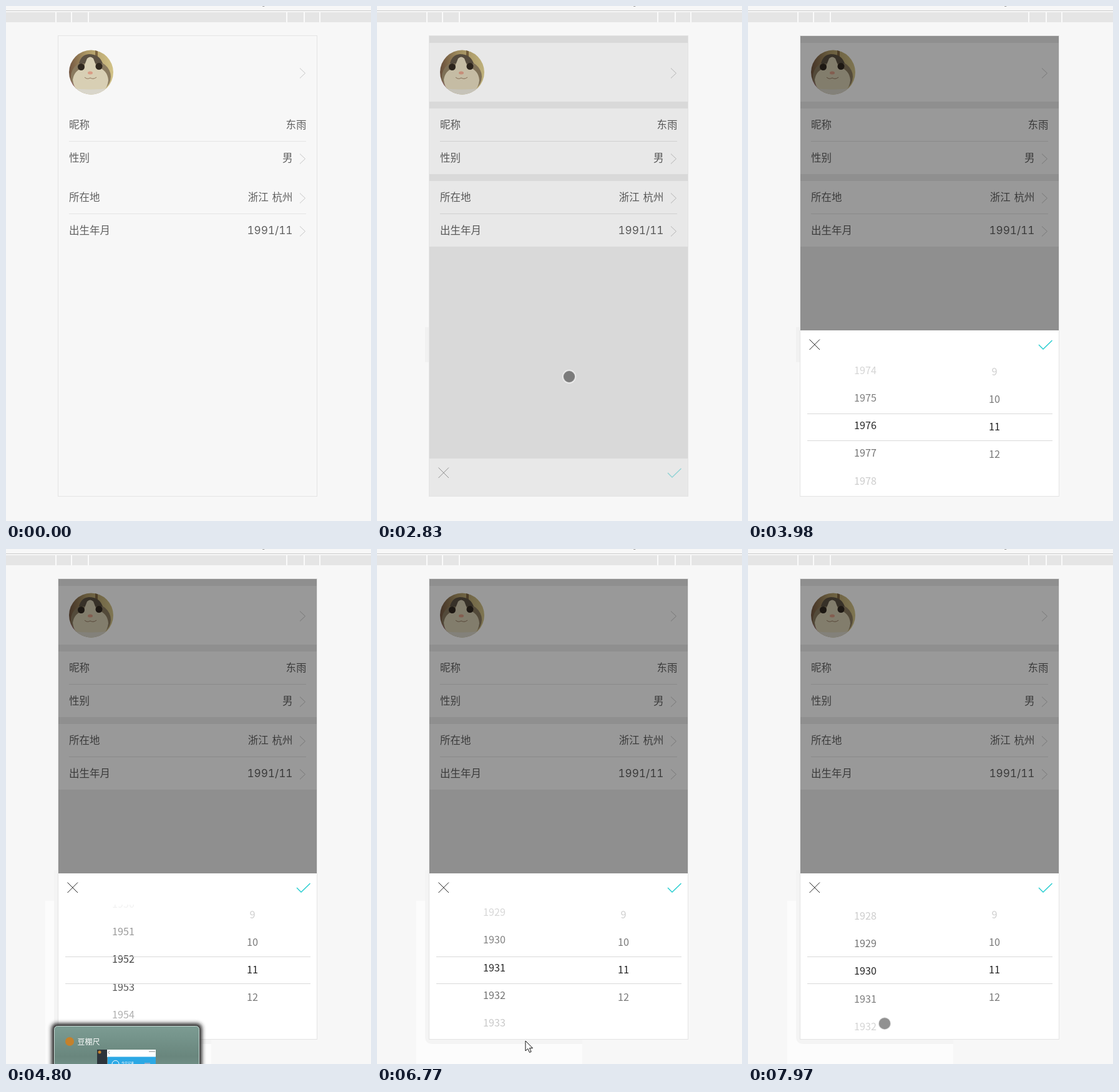
These frames come from a looping animation (585x824 px, 8000 ms). An HTML page:

```html
<!DOCTYPE html>
<html lang="zh">
<head>
<meta charset="utf-8">
<title>Birthday picker</title>
<style>
  html, body { margin: 0; width: 100%; height: 100%; overflow: hidden; background: #f7f7f7; }
  svg { display: block; width: 585px; height: 824px; }
  text { font: 16.5px "Noto Sans CJK SC", "Noto Sans CJK", sans-serif; fill: #606060; word-spacing: 2px; }
  .end { text-anchor: end; }
  .num { font-family: Inter, "Liberation Sans", sans-serif; font-variant-numeric: tabular-nums; }
  .value { font-size: 17.2px; }
  .wheel text { font-size: 16.2px; fill: #222; text-anchor: middle; }
  .title { font-size: 12px; fill: #fff; }
  .tiny { font-size: 5px; fill: #fff; }
  .thin { fill: none; stroke-width: 1; }
</style>
</head>
<body>
<svg viewBox="0 0 585 824">
  <defs>
    <clipPath id="face"><circle cx="136.5" cy="106" r="35.5"/></clipPath>
    <clipPath id="phone"><rect x="84" y="48" width="414" height="736"/></clipPath>
    <clipPath id="drum"><rect x="84" y="569" width="414" height="213"/></clipPath>
    <filter id="blur" x="-20%" y="-20%" width="140%" height="140%"><feGaussianBlur stdDeviation="3"/></filter>
    <linearGradient id="wall"><stop stop-color="#70533f"/><stop offset=".4" stop-color="#ad9865"/><stop offset="1" stop-color="#d3c489"/></linearGradient>
    <linearGradient id="glass" x2="0" y2="1"><stop stop-color="#7c9c93"/><stop offset=".6" stop-color="#69867d"/><stop offset="1" stop-color="#789890"/></linearGradient>
  </defs>

  <rect width="585" height="824" fill="#f7f7f7"/>
  <path d="M411 0q2 1 4-.5" class="thin" stroke="#777"/>
  <path d="M0 7.5H585" class="thin" stroke="#cbcbcb"/>
  <rect y="10" width="585" height="16" fill="#e5e5e5"/>
  <path d="M80 10v16M105 10v16M132 10v16M450 10v16M478 10v16M503 10v16" stroke="#fafafa" stroke-width="2"/>

  <rect id="tab" x="77" y="514" width="8" height="56" fill="#f1f1f1"/>
  <g id="halo">
    <rect x="63" y="563" width="266" height="261" fill="#fcfcfc"/>
    <path d="M77 514h8v270h244v8H89q-12 0-12-12z" fill="#f4f4f4"/>
  </g>

  <g clip-path="url(#phone)">
    <rect id="back" x="84" y="48" width="414" height="736"/>
    <path id="bands" d="M84 59h414v94H84zM84 164h414v105H84zM84 280h414v105H84z"/>
    <path d="M101 216.5H481M101 332.5H481" class="thin" stroke="#e4e4e4"/>
    <g clip-path="url(#face)">
      <rect x="100" y="70" width="73" height="73" fill="url(#wall)"/>
      <path d="M143 70h4v22h-4z" fill="#7c643f"/>
      <path d="M100 118l14 8v18h-14z" fill="#9c6670"/>
      <ellipse cx="136" cy="113" rx="32" ry="27" fill="#8a7b60"/>
      <path d="M117 92q3-14 16-15 17 0 22 15z" fill="#5c5143"/>
      <path d="M130 84q5-5 10 0l5 13q18 5 19 22-3 24-29 24-25 0-28-25 2-15 17-19z" fill="#d8cfb4"/>
      <circle cx="120.500" cy="97.500" r="5.500" fill="#30281f"/>
      <circle cx="149" cy="96.500" r="5.500" fill="#30281f"/>
      <ellipse cx="135" cy="107" rx="4" ry="2.500" fill="#d99c85"/>
      <path d="M126 114q4 4 9 1 5 3 10-1" class="thin" stroke="#8f755c"/>
      <path d="M102 131q34 5 68 0v14h-68z" fill="#d9d6cb"/>
    </g>
    <text x="101" y="196">昵称</text><text x="481.5" y="196" class="end">东雨</text>
    <text x="101" y="249">性别</text><text x="459.5" y="249" class="end">男</text>
    <text x="101" y="312">所在地</text><text x="459.5" y="312" class="end">浙江 杭州</text>
    <text x="101" y="365">出生年月</text><text x="459.5" y="365" class="end num value">1991/11</text>
    <path d="M471 99.500l8.500 8-8.500 8M471 236.500l8.500 8-8.500 8M471 299.500l8.500 8-8.500 8M471 352.500l8.500 8-8.500 8" class="thin" stroke="#c6c6c6"/>
    <rect id="shade" x="84" y="48" width="414" height="736"/>
    <g id="sheet">
      <rect x="84" y="519" width="414" height="266" fill="#fff"/>
      <path d="M98.500 533.500l16.500 16.500M115 533.500l-16.500 16.500" class="thin" stroke="#222" stroke-width="1.200"/>
      <path d="M466 542l7 7 14.500-14" fill="none" stroke="#22cccf" stroke-width="1.400"/>
      <g clip-path="url(#drum)"><g id="wheel" class="wheel num"></g></g>
      <path d="M95 652.500H488M95 695.500H488" class="thin" stroke="#d9d9d9"/>
    </g>
  </g>
  <rect x="83.500" y="47.500" width="415" height="737" class="thin" stroke="#e4e4e4"/>

  <g id="preview">
    <rect x="73" y="759" width="241" height="80" rx="8" fill="#222" filter="url(#blur)"/>
    <rect x="77.500" y="763.500" width="232" height="80" rx="5" fill="url(#glass)" stroke="#c9dcd6"/>
    <circle cx="102" cy="788" r="7" fill="#c4812c"/>
    <text x="114.500" y="792.500" class="title">豆棚尺</text>
    <rect x="146" y="801" width="16" height="23" fill="#2d343b"/>
    <circle cx="150" cy="805" r="2.500" fill="#c4812c"/>
    <rect x="162" y="801" width="78" height="12" fill="#fff"/>
    <path d="M166 803l-2 2.500 2 2.500M229 804h10" class="thin" stroke="#888"/>
    <rect x="163" y="812.500" width="77" height="12" fill="#2ca8e4"/>
    <circle cx="175.500" cy="824" r="5.500" class="thin" stroke="#fff"/>
    <text x="185" y="824" class="tiny">今日记录</text>
    <path d="M222 823h9" class="thin" stroke="#f3b0b0"/>
  </g>

  <circle id="dot" r="10" fill="#000" fill-opacity=".43" stroke="#fff" stroke-opacity=".65" stroke-width="2"/>
  <path id="arrow" d="M0 0v16l3.800-3.500 2.700 6 2.600-1.200-2.600-5.700h5z" fill="#fff" stroke="#111"/>
</svg>

<script>
const LOOP = 8000, ROW = 44.3, MID = 673.5;
const $ = id => document.getElementById(id);
const clamp = v => Math.min(1, Math.max(0, v));
const span = (t, a, b) => clamp((t - a) / (b - a));
const smooth = u => u * u * (3 - 2 * u);
const cubic = u => u * u * u;

// Pointer stops: time, x, y, optional easing into the stop
const stops = [
  [1940, 98, 768], [2250, 412, 370], [2380, 412, 370], [2590, 308, 593],
  [2900, 308, 593], [3250, 200, 600], [3450, 200, 600], [3820, 200, 773, cubic],
  [3880, 205, 845], [5290, 240, 845], [5480, 215, 694], [5560, 215, 694],
  [5760, 215, 757], [5770, 215, 762], [5840, 236, 800], [6770, 238, 787],
  [6950, 236, 790], [7250, 225, 482], [7480, 219, 713], [7890, 219, 770],
  [8000, 219, 757]
];

// Drags: press, release, settle, year at press, year at rest
const drags = [
  [3450, 3820, 5010, 1991, 1952],
  [5560, 5770, 6910, 1952, 1931],
  [7480, 8000, 8000, 1931, 1930]
];

function pointer(t) {
  const i = stops.findIndex(s => s[0] > t);
  if (i < 1) return null;
  const a = stops[i - 1], b = stops[i];
  const u = (b[3] || smooth)(span(t, a[0], b[0]));
  return { x: a[1] + (b[1] - a[1]) * u, y: a[2] + (b[2] - a[2]) * u };
}

const stopY = t => stops.find(s => s[0] === t)[2];

function yearAt(t) {
  const drag = drags.filter(d => d[0] <= t).pop();
  if (!drag) return 1991;
  const [press, release, settle, from, to] = drag;
  const pulled = y => from - (y - stopY(press)) / ROW;
  if (t < release) return pulled(pointer(t).y);
  return to + (pulled(stopY(release)) - to) * Math.pow(1 - span(t, release, settle), 2.6);
}

function addLabel(x, label) {
  const el = document.createElementNS("http://www.w3.org/2000/svg", "text");
  el.setAttribute("x", x);
  el.textContent = label;
  $("wheel").append(el);
  return el;
}

function placeLabel(el, offset) {
  const d = offset * ROW;
  el.setAttribute("y", MID + d + 5.8);
  el.setAttribute("opacity", clamp(1 - Math.abs(d) / 112));
}

const years = Array.from({ length: 7 }, () => addLabel(188, ""));
[9, 10, 11, 12].forEach(m => placeLabel(addLabel(395, m), (m - 11) * 44 / ROW));

function put(el, shown, p) {
  el.setAttribute("visibility", shown ? "visible" : "hidden");
  if (shown) el.setAttribute("transform", `translate(${p.x} ${p.y})`);
}

function draw(t) {
  const open = t >= 2770;
  const rise = 1 - Math.pow(1 - span(t, 2770, 3170), 1.55);
  $("back").setAttribute("fill", open ? "#eeeeee" : "#f7f7f7");
  $("bands").setAttribute("fill", open ? "#fff" : "#f7f7f7");
  $("shade").setAttribute("opacity", 0.4 * rise);
  $("sheet").setAttribute("opacity", clamp(rise * 1.75));
  $("sheet").setAttribute("transform", `translate(0 ${265 * (1 - rise)})`);

  const year = yearAt(t), near = Math.round(year);
  years.forEach((el, i) => {
    const n = near + i - 3;
    el.textContent = n;
    placeLabel(el, n - year);
  });

  const fadeIn = span(t, 4280, 4400);
  $("tab").setAttribute("opacity", span(t, 1150, 1270));
  $("halo").setAttribute("opacity", fadeIn);
  $("preview").setAttribute("opacity", fadeIn * (1 - span(t, 4880, 5010)));

  const p = pointer(t);
  put($("dot"), p && p.y < 785, p);
  put($("arrow"), p && p.y >= 785, p);
}

const start = performance.now();
function tick() {
  draw((performance.now() - start) % LOOP);
  requestAnimationFrame(tick);
}
tick();
</script>
</body>
</html>
```
